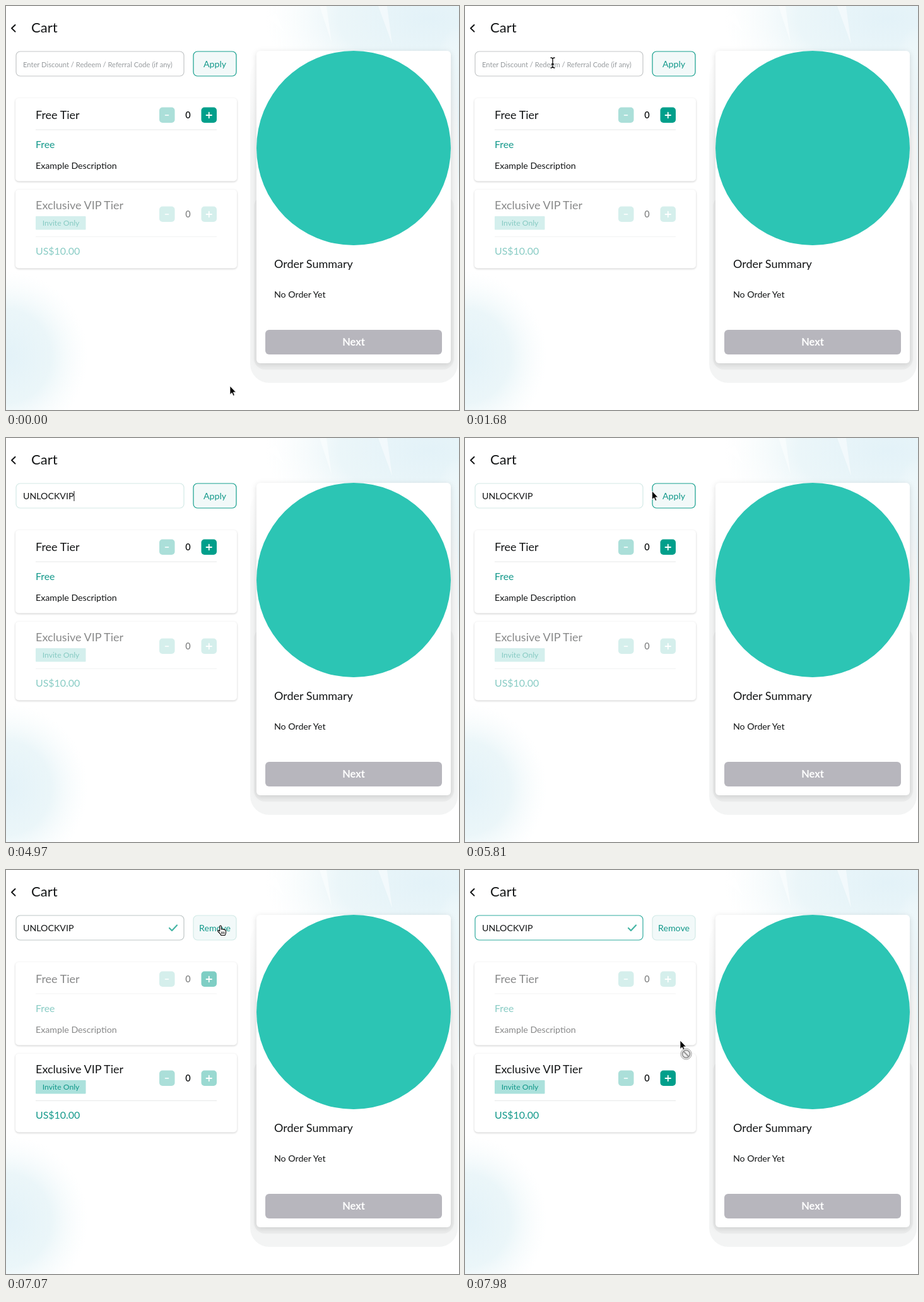
Write an HTML page that moves like this. It is 718 px wide and 640 px high and loops after 8000 ms.

```html
<!DOCTYPE html>
<html lang="en">
<head>
<meta charset="utf-8">
<title>Cart</title>
<style>
  html, body { margin: 0; width: 100%; height: 100%; overflow: hidden; background: #fff; }
  svg { display: block; font-family: Lato, sans-serif; font-size: 14.2px; fill: #131516; }
  .title { font-size: 18px; }
  .teal { fill: #12988a; }
  .count { font-weight: 600; font-size: 14.5px; text-anchor: middle; }
  .mid { text-anchor: middle; }
  .card { fill: #fff; filter: drop-shadow(0 1px 1.5px #0003); }
  .line { fill: none; stroke-linecap: round; stroke-linejoin: round; }
</style>
</head>
<body>
<svg width="718" height="640" viewBox="0 0 718 640">
  <defs>
    <radialGradient id="haze">
      <stop offset="0" stop-color="#e3f2f8"/>
      <stop offset=".55" stop-color="#ebf6f9"/>
      <stop offset="1" stop-color="#f6fbfc" stop-opacity="0"/>
    </radialGradient>
    <linearGradient id="shade" x2="0" y2="1">
      <stop offset="0" stop-color="#f3f4f4" stop-opacity="0"/>
      <stop offset=".25" stop-color="#f3f4f4"/>
    </linearGradient>
  </defs>

  <ellipse cx="670" cy="20" rx="260" ry="140" fill="url(#haze)"/>
  <ellipse cx="718" cy="180" rx="50" ry="150" fill="url(#haze)"/>
  <ellipse cx="0" cy="555" rx="130" ry="135" fill="url(#haze)"/>
  <path d="M497 0L516 58L508 0ZM415 18L440 40L428 12ZM590 0L612 60L604 0Z" fill="#fff" opacity=".45"/>

  <rect x="387" y="82" width="329" height="515" rx="30" fill="url(#shade)"/>
  <rect x="393" y="300" width="317" height="276" rx="18" fill="#ebecec"/>
  <rect x="397" y="71" width="308" height="495" rx="6" fill="#fff" style="filter:drop-shadow(0 2px 4px #0002)"/>
  <circle cx="551" cy="225" r="154" fill="#2cc5b4"/>
  <text class="title" x="425" y="415">Order Summary</text>
  <text x="425" y="462">No Order Yet</text>
  <rect x="411" y="513" width="280" height="39" rx="6" fill="#b7b6bd"/>
  <text class="mid" x="551" y="538" font-size="16.4" font-weight="700" fill="#fff">Next</text>

  <path class="line" d="M14.5 30L9 35.3L14.5 40.6" stroke="#131516" stroke-width="2"/>
  <text x="40" y="42" font-size="22">Cart</text>

  <rect id="field" x="16" y="72" width="266" height="39" rx="6.5" fill="#fff" stroke-width="1.2"/>
  <text id="hint" x="27" y="96.5" font-size="11.2" fill="#989c9f">Enter Discount / Redeem / Referral Code (if any)</text>
  <text id="code" x="27" y="96.5"></text>
  <rect id="caret" y="84" width="1" height="16"/>
  <path id="check" class="line" d="M259 92L263 96L271 87.5" stroke="#45b5a5" stroke-width="2.2"/>
  <rect id="wave" fill="#12988a"/>
  <rect id="button" x="297" y="72" width="68" height="39" rx="6.5" fill="#f2f9f9" stroke-width="1.2"/>
  <text id="action" class="teal mid" x="331" y="96.5"></text>

  <g id="tiers"></g>
  <g id="pointer"></g>
</svg>

<script>
const LOOP = 8000, STEP = 70;
const $ = id => document.getElementById(id);
const show = (id, on) => $(id).style.display = on ? '' : 'none';
const set = (id, attrs) => { for (const k in attrs) $(id).setAttribute(k, attrs[k]); };
const mix = (a, b, p) => a + (b - a) * p;
const clamp = p => Math.max(0, Math.min(1, p));

// Tier cards
const counter = (id, y) => `
  <rect x="243" y="${y}" width="24.5" height="24.5" rx="5" fill="#009f8b" opacity=".33"/>
  <path class="line" d="M252.5 ${y + 12.5}h5" stroke="#fff" stroke-width="1.6"/>
  <text class="count" x="288.5" y="${y + 17.5}">0</text>
  <rect id="${id}Plus" x="309.5" y="${y}" width="24.5" height="24.5" rx="5" fill="#009f8b"/>
  <path class="line" d="M317.5 ${y + 12.5}h8.5m-4.25 -4.25v8.5" stroke="#fff" stroke-width="1.8"/>`;

const tier = (id, top, height, buttonY, ruleY, content) => `
  <rect class="card" x="15" y="${top}" width="351" height="${height}" rx="5"/>
  <g id="${id}">${counter(id, buttonY)}
    <path d="M47 ${ruleY}H334" stroke="#e6e8e8"/>${content}
  </g>`;

$('tiers').innerHTML =
  tier('free', 146, 131.5, 160.5, 196, `
    <text class="title" x="47" y="179">Free Tier</text>
    <text class="teal" x="47" y="225" font-size="15.8">Free</text>
    <text x="47" y="257.5">Example Description</text>`) +
  tier('vip', 291, 124.5, 317.5, 365.5, `
    <text class="title" x="47" y="322">Exclusive VIP Tier</text>
    <rect x="47" y="333" width="79.5" height="21.5" rx="1" fill="#abe1dc"/>
    <text class="teal mid" x="87" y="348" font-size="12.2">Invite Only</text>
    <text class="teal" x="47" y="394" font-size="15.9">US$10.00</text>`);

// Pointer shapes, drawn from the hot spot
const arrow = '<path d="M0 0V13.5L3.1 10.7L5.2 15.5L7.3 14.6L5.3 9.9H9.5Z" fill="#000" stroke="#fff" stroke-width=".8"/>';
const shapes = {
  arrow,
  denied: `${arrow}<circle cx="9.5" cy="21.5" r="8.6" fill="#fff" stroke="#999" stroke-width="1"/>
    <circle cx="9.5" cy="21.5" r="6" fill="#eee" stroke="#999" stroke-width="2"/>
    <path d="M5.3 17.3l8.4 8.4" stroke="#999" stroke-width="2"/>`,
  beam: '<path class="line" d="M-3 -8Q0 -8 0 -6Q0 -8 3 -8M0 -6V6M-3 8Q0 8 0 6Q0 8 3 8M-1.5 2h3" stroke="#000" stroke-width="1.3"/>',
  hand: `<path d="M-1.3 9V1.2Q-1.2 0 0 0T1.3 1.2V6Q2.6 5 4 6.2Q5.3 5.4 6.3 6.9Q8.5 6.4 8.5 8.5V11Q8.5 13 7 15.5H1Q0 13 -4 9.5Q-5 7.2 -2.8 7.6Z"
    fill="#fff" stroke="#000" stroke-width="1.1" stroke-linejoin="round"/>
    <path class="line" d="M1.6 10v3M3.7 10v3M5.8 10v3" stroke="#000" stroke-width=".9"/>`
};

// time, x, y
const path = [
  [0, 355, 602], [910, 355, 602], [1680, 139, 90], [5530, 139, 90], [5670, 200, 77],
  [5950, 393, 91], [6230, 340, 88], [7630, 340, 88], [7980, 341, 270], [LOOP, 341, 270]
];

function pointerAt(t) {
  const i = path.findIndex(k => k[0] > t);
  const [t0, x0, y0] = path[i - 1], [t1, x1, y1] = path[i];
  const p = (t - t0) / (t1 - t0), e = p * p * (3 - 2 * p);
  return [mix(x0, x1, e), mix(y0, y1, e)];
}

function shapeAt(x, y, applied) {
  const inside = (l, t, r, b) => x >= l && x <= r && y >= t && y <= b;
  if (inside(16, 72, 282, 111)) return 'beam';
  if (inside(297, 72, 365, 111)) return 'hand';
  if (applied ? inside(15, 146, 366, 278) : inside(15, 291, 366, 416)) return 'denied';
  return 'arrow';
}

const CODE = 'UNLOCKVIP';
const keyTimes = [3570, 3850, 4130, 4270, 4340, 4410, 4620, 4760, 4970];
const caretSpans = [[2310, 2870], [3360, 5530], [6020, 6580]];
const within = (t, [a, b]) => t >= a && t < b;

function fieldBorder(t, fade) {
  if (t < 2450) return '#c3c6c7';
  if (t < 7070) return '#d3e9e6';
  const [r, g, b] = [[190, 47], [198, 171], [198, 157]].map(([a, z]) => mix(a, z, fade));
  return `rgb(${r},${g},${b})`;
}

function draw(t) {
  const applied = t >= 7070, fade = clamp((t - 7070) / 210);

  $('code').textContent = CODE.slice(0, keyTimes.filter(k => k <= t).length);
  show('hint', t < keyTimes[0]);
  show('caret', caretSpans.some(s => within(t, s)));
  set('caret', { x: 27 + $('code').getComputedTextLength() });
  set('field', { stroke: fieldBorder(t, fade) });
  show('check', applied);
  $('action').textContent = applied ? 'Remove' : 'Apply';
  set('button', { stroke: applied ? '#d2eae7' : '#159f8d' });

  const spread = clamp((t - 6580) / 210) * 15;
  set('wave', {
    x: 297 - spread, y: 72 - spread, width: 68 + 2 * spread, height: 39 + 2 * spread,
    rx: 6.5 + spread, opacity: .2 * (1 - spread / 15)
  });
  show('wave', within(t, [6650, 6790]));

  set('free', { opacity: applied ? .5 : 1 });
  set('vip', { opacity: applied ? 1 : .5 });
  set('freePlus', { opacity: mix(1, .33, fade) });
  set('vipPlus', { opacity: mix(.33, 1, clamp(fade + (applied ? .1 : 0))) });

  const [x, y] = pointerAt(t);
  show('pointer', !within(t, [280, 910]) && !within(t, [3570, 5530]));
  set('pointer', { transform: `translate(${x} ${y})` });
  $('pointer').innerHTML = shapes[shapeAt(x, y, applied)];
}

function tick() {
  const t = performance.now() % LOOP;
  draw(Math.floor(t / STEP) * STEP);
  requestAnimationFrame(tick);
}
tick();
</script>
</body>
</html>
```
